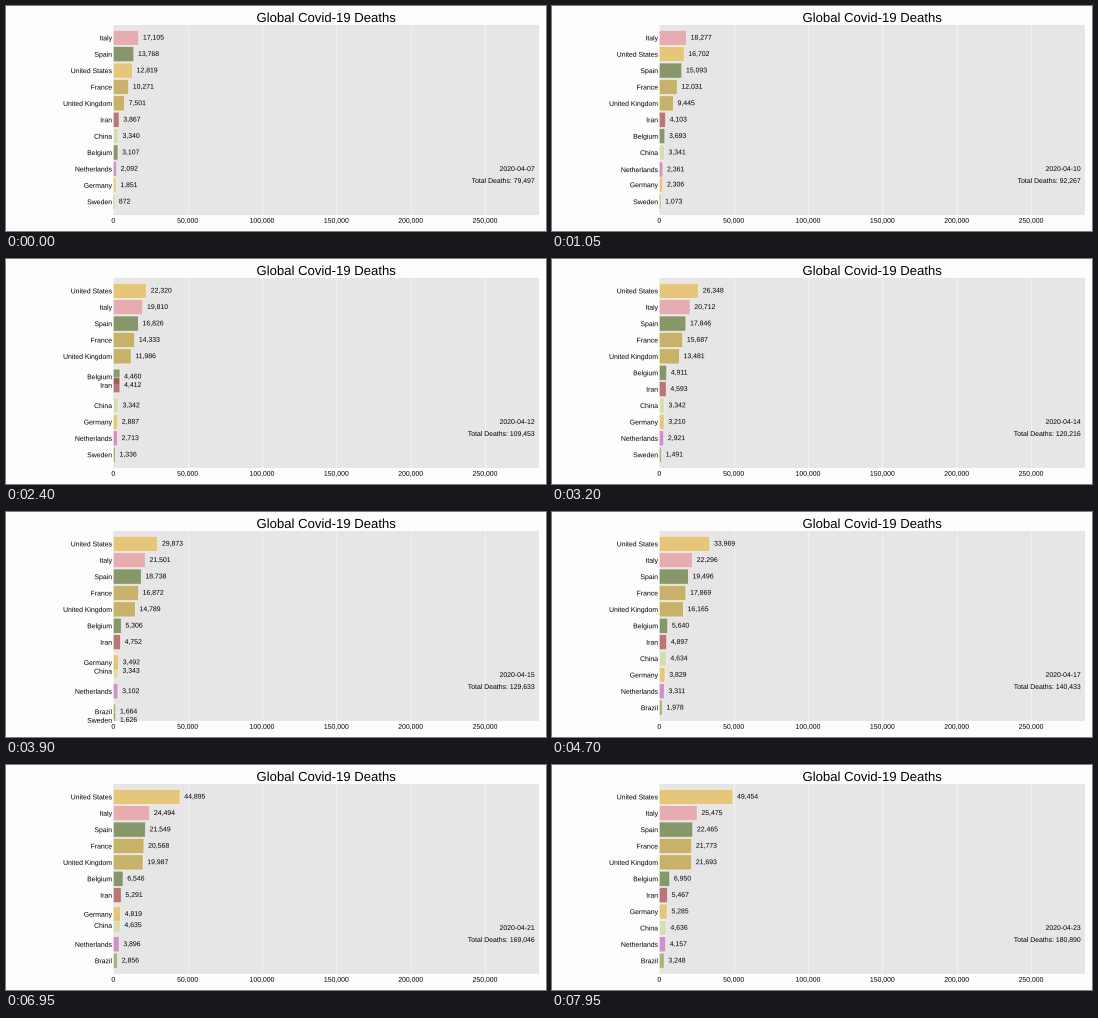
Recreate the animation shown at these times as a matplotlib script. Size 540 by 225 pixels, loop 8000 ms.

```python
import math

import matplotlib.pyplot as plt
import numpy as np
from matplotlib.animation import FuncAnimation
from matplotlib.patheffects import Normal
from matplotlib.ticker import MultipleLocator

plt.rcParams.update({
    "font.family": "Liberation Sans",
    "text.hinting": "none",
    "path.effects": [Normal()],   # text as outlines, free of the pixel grid
})

W, H, DPI = 540, 225, 45
N_FRAMES, INTERVAL = 160, 50
STEPS = 25                        # interpolation steps per day
N_DAYS, N_BARS = 18, 11
FIRST, LAST, STEP_RATE = 24, 421, 2.5
X_MAX = 286300
BAR = 0.92

OLIVE, MOSS, LIME = "#637939", "#8ca252", "#cedb9c"
OCHRE, GOLD = "#bd9e39", "#e7ba52"
BRICK, ROSE, ORCHID = "#ad494a", "#e7969c", "#ce6dbd"

# Key values, spread evenly over the loop.
SERIES = {
    "Belgium": (OLIVE, [3107, 5345, 6950]),
    "Brazil": (MOSS, [135, 3248]),
    "China": (LIME, [3340, 3346]),
    "France": (OCHRE, [10271, 16990, 21773]),
    "Germany": (GOLD, [1851, 2720, 3520, 4360, 5285]),
    "Iran": (BRICK, [3867, 4768, 5467]),
    "Italy": (ROSE, [17105, 21580, 25475]),
    "Netherlands": (ORCHID, [2092, 3120, 4157]),
    "Spain": (OLIVE, [13768, 18827, 22465]),
    "Sweden": (MOSS, [872, 1640, 2300]),
    "United Kingdom": (OCHRE, [7501, 14920, 21693]),
    "United States": (GOLD, [12819, 20230, 30225, 40405, 49454]),
}
TOTAL = [79497, 103870, 130575, 157380, 180890]

steps = np.arange((N_DAYS - 1) * STEPS + 1)
day_steps = np.arange(N_DAYS) * STEPS


def grow(values):
    return np.interp(steps, np.linspace(FIRST, LAST, len(values)), values)


names = list(SERIES)
colors = [color for color, _ in SERIES.values()]
deaths = np.array([grow(values) for _, values in SERIES.values()])
total = grow(TOTAL)

# China's count is revised upwards within one day.
deaths[names.index("China")] += 1290 * np.clip(steps / STEPS - 9, 0, 1)

# Bars glide linearly between their rows of consecutive days; row 0 is hidden.
ranks = (-deaths[:, day_steps]).argsort(axis=0).argsort(axis=0)
rows = np.array([np.interp(steps, day_steps, np.clip(N_BARS - r, 0, None)) for r in ranks])

fig = plt.figure(figsize=(W / DPI, H / DPI), dpi=DPI, facecolor="#fdfdfe")
left, right, top, bottom = 107.3, 533, 18.7, 208.8
ax = fig.add_axes([left / W, 1 - bottom / H, (right - left) / W, (bottom - top) / H],
                  facecolor="0.9")
ax.set_xlim(0, X_MAX)
ax.set_ylim(0.2, N_BARS + 0.8)
ax.set_yticks([])
ax.xaxis.set_major_locator(MultipleLocator(50000))
ax.xaxis.set_major_formatter("{x:,.0f}")
ax.tick_params(length=0, labelsize=11, pad=4.7)
ax.grid(True, axis="x", color="white", lw=0.8)
ax.set_axisbelow(True)
ax.spines[:].set_visible(False)
ax.set_title("Global Covid-19 Deaths", size=21, pad=4)

bars = ax.barh(rows[:, 0], deaths[:, 0], BAR, color=colors, ec="white", lw=1,
               alpha=0.72, snap=False)
name_x = -1.25 / (right - left) * X_MAX
labels = [ax.text(name_x, 0, name, size=11, ha="right", va="center_baseline") for name in names]
counts = [ax.text(0, 0, "", size=11, va="center") for _ in names]


def note(y):
    return ax.text(0.99, y, "", size=11, ha="right", va="center", transform=ax.transAxes)


date_note, total_note = note(0.24), note(0.177)


def update(frame):
    step = FIRST + int(STEP_RATE * frame)
    for i, (bar, label, count) in enumerate(zip(bars, labels, counts)):
        value, row = deaths[i, step], rows[i, step]
        bar.set_width(value)
        bar.set_y(row - BAR / 2)
        label.set_y(row)
        count.set_position((value + 0.01 * X_MAX, row))
        count.set_text(f"{value:,.0f}")
        bar.set_visible(row > 0)
        count.set_visible(row > 0)
        label.set_visible(row >= 0.2)
    date_note.set_text(f"2020-04-{6 + math.ceil(step / STEPS):02d}")
    total_note.set_text(f"Total Deaths: {total[step]:,.0f}")


anim = FuncAnimation(fig, update, frames=N_FRAMES, interval=INTERVAL,
                     repeat=True, repeat_delay=0)
plt.show()
```
